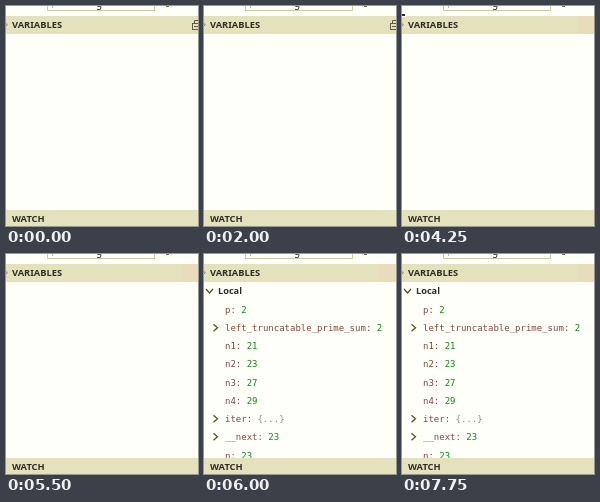
Animation of 192x220 px, one loop 8 s. Source, as an HTML page with a canvas:

```html
<!DOCTYPE html>
<html lang="en">
<head>
<meta charset="utf-8">
<title>Variables panel</title>
<style>
  html, body { margin: 0; width: 100%; height: 100%; overflow: hidden; }
  canvas { display: block; width: 192px; height: 220px; }
</style>
</head>
<body>
<canvas id="stage" width="192" height="220"></canvas>
<script>
const ctx = document.getElementById('stage').getContext('2d');
const LOOP = 8000;
const SANS = '"Noto Sans", "Open Sans", sans-serif';
const MONO = '"DejaVu Sans Mono", "Noto Sans Mono", monospace';
const C = {
  panel: '#fffff9', header: '#e4e2bd', idle: '#e8dcbc', edge: '#cdcba4', ink: '#2e2d27',
  name: '#84483f', number: '#0b8a1c', object: '#8f8e70', chevron: '#55571f'
};
const ROW = 18.25;
const SCOPES = ['Local', 'Static', 'Global', 'Registers'];
const VARIABLES = [
  ['p', '2'], ['left_truncatable_prime_sum', '2', true],
  ['n1', '21'], ['n2', '23'], ['n3', '27'], ['n4', '29'],
  ['iter', '{...}', true], ['__next', '23', true], ['n', '23']
];
// Pointer samples: time, shape, left, top; each holds for a quarter second.
const POINTER = [
  [1250, hand, 136, 4], [1500, hand, 96, 2], [1750, hand, 68, 0],
  [4250, rowResize, -14, 1.5], [4500, rowResize, 6, 2],
  [4750, rowResize, 38, 1], [5000, rowResize, 30, 1]
];

function rect(x, y, w, h, color) {
  ctx.fillStyle = color;
  ctx.fillRect(x, y, w, h);
}

function text(str, x, y, font, color) {
  ctx.font = font;
  ctx.fillStyle = color;
  ctx.fillText(str, x, y);
}

function line(points, color, width = 1) {
  ctx.beginPath();
  points.forEach(([x, y]) => ctx.lineTo(x, y));
  ctx.strokeStyle = color;
  ctx.lineWidth = width;
  ctx.stroke();
}

function chevron(x, y, open) {
  line(open ? [[x - 3.5, y - 2], [x, y + 2], [x + 3.5, y - 2]]
            : [[x - 2, y - 3.5], [x + 2, y], [x - 2, y + 3.5]], C.chevron, 1.3);
}

function header(label, y, h, baseline) {
  rect(0, y, 192, h, C.header);
  text(label, 6, baseline, `bold 9.3px ${SANS}`, C.ink);
}

function toolbar() {
  rect(41, 0, 1, 5, C.edge);
  rect(148, 0, 1, 5, C.edge);
  rect(41, 4, 108, 1, C.edge);
  rect(46, 0, 1, 2, '#a9c98c');
  text('g', 90, 0.5, `10px ${SANS}`, C.ink);
  rect(160, 0, 3, 1, '#77745a');
}

function collapseIcon() {
  const color = '#5f5d49';
  ctx.strokeStyle = color;
  ctx.lineWidth = 1;
  ctx.strokeRect(186.5, 17.5, 7, 6);
  line([[188.5, 17], [188.5, 14.5], [193, 14.5]], color);
  line([[188, 20.5], [192, 20.5]], color);
}

function variablesHeader(hovered) {
  header('VARIABLES', 10, 18, 22);
  line([[-1, 16.5], [1.2, 18.7], [-1, 21]], '#9a7460');
  if (hovered) collapseIcon();
  else rect(175, 10, 17, 18, C.idle);
}

function scopeRow(label, i, open) {
  chevron(5.5, 37 + i * ROW, open);
  text(label, 14, 40.3 + i * ROW, `bold 9.2px ${SANS}`, C.ink);
}

function variableRow([name, value, nested], i) {
  const y = Math.round(58.6 + i * ROW), font = `9px ${MONO}`;
  if (nested) chevron(11.5, y - 3.2, false);
  text(name + ':', 21, y, font, C.name);
  const gap = ctx.measureText(name + ': ').width;
  text(value, 21 + gap, y, font, value[0] === '{' ? C.object : C.number);
}

function hand() {
  ctx.beginPath();
  ctx.moveTo(5, 1.5);
  ctx.quadraticCurveTo(6.5, -0.5, 8.5, 1.5);
  ctx.lineTo(9.5, 6);
  ctx.lineTo(14, 7);
  ctx.quadraticCurveTo(17.5, 7.5, 17.5, 11);
  ctx.lineTo(16, 16);
  ctx.lineTo(16, 19.5);
  ctx.lineTo(7, 19.5);
  ctx.lineTo(6, 16.5);
  ctx.lineTo(0.7, 11);
  ctx.quadraticCurveTo(1, 8.5, 3.5, 9.5);
  ctx.lineTo(6, 11);
  ctx.closePath();
  ctx.fillStyle = '#3d3d36';
  ctx.fill();
  ctx.strokeStyle = '#85846f';
  ctx.lineWidth = 0.6;
  ctx.stroke();
}

// Horizontal bar with an arrow above and below.
function rowResize() {
  const shape = new Path2D();
  shape.rect(1, 6.5, 16, 2);
  shape.rect(8, 3, 2, 9);
  for (const dir of [-1, 1]) {
    shape.moveTo(9, 7.5 + dir * 6.5);
    shape.lineTo(5.5, 7.5 + dir * 3);
    shape.lineTo(12.5, 7.5 + dir * 3);
    shape.closePath();
  }
  ctx.strokeStyle = '#fffff4';
  ctx.lineWidth = 2;
  ctx.stroke(shape);
  ctx.fillStyle = C.ink;
  ctx.fill(shape);
}

function pointer(t) {
  const sample = POINTER.find(([start]) => t >= start && t < start + 250);
  if (!sample) return;
  const [, shape, x, y] = sample;
  ctx.save();
  ctx.translate(x, y);
  shape();
  ctx.restore();
}

function draw(t) {
  rect(0, 0, 192, 220, C.panel);
  toolbar();
  variablesHeader(t < 2750);
  if (t >= 6000) {
    scopeRow('Local', 0, true);
    VARIABLES.forEach(variableRow);
  } else if (t >= 5750) {
    SCOPES.forEach((label, i) => scopeRow(label, i, false));
  }
  header('WATCH', 204, 16, 216);
  pointer(t);
}

function tick(now) {
  draw(now % LOOP);
  requestAnimationFrame(tick);
}
draw(0);
requestAnimationFrame(tick);
</script>
</body>
</html>
```
